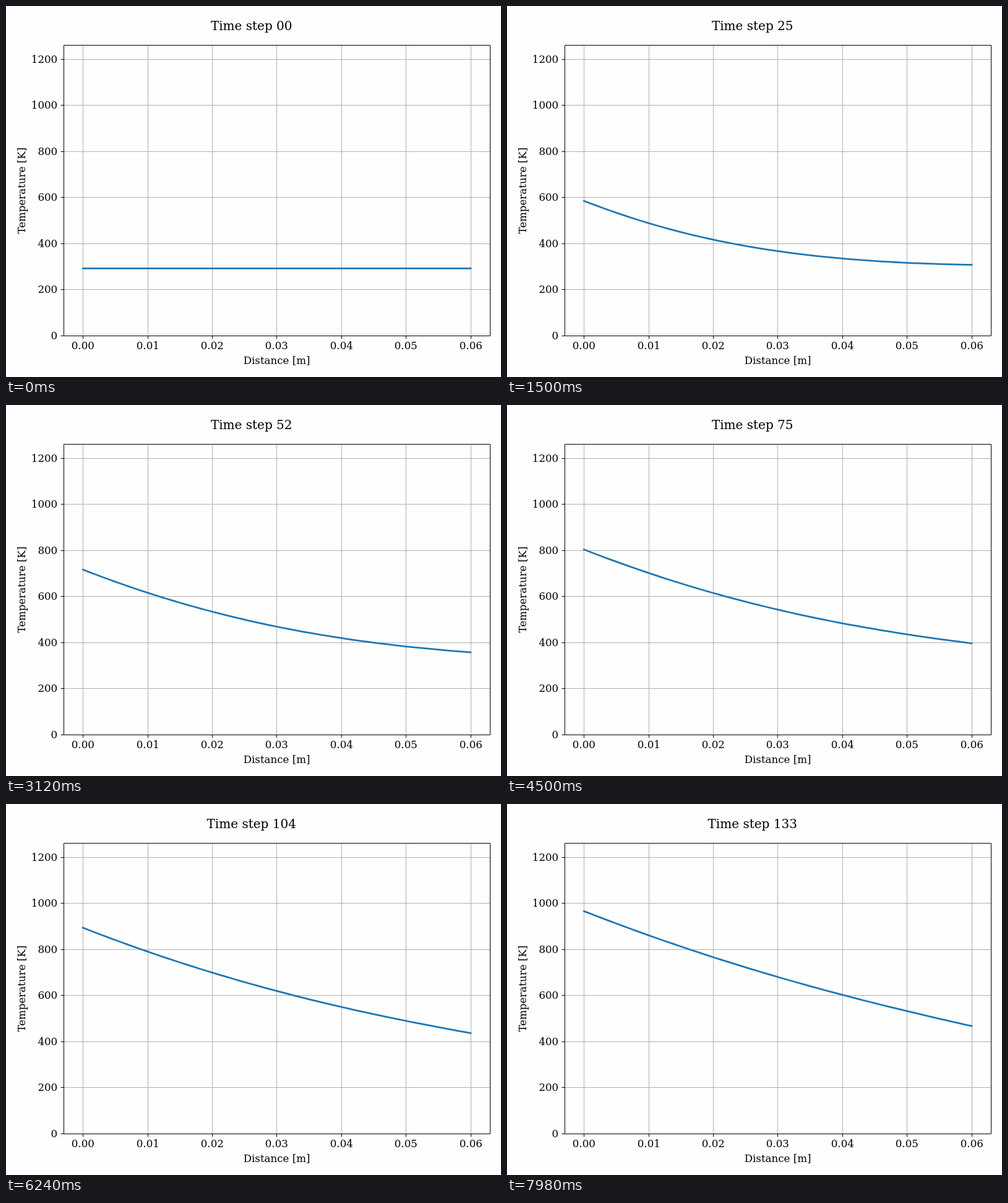
Write an HTML page that moves like this. It is 800 px wide and 600 px high and loops after 8000 ms.

```html
<!DOCTYPE html>
<html lang="en">
<head>
<meta charset="utf-8">
<title>Heat conduction</title>
<style>
html, body { margin: 0; width: 100%; height: 100%; overflow: hidden; background: #fefefe; }
svg { display: block; width: 800px; height: 600px; }
text { font: 16.667px "DejaVu Serif", "Noto Serif", serif; text-anchor: middle; fill: #000; }
#title { font-size: 20px; }
.right { text-anchor: end; }
path { fill: none; }
#grid { stroke: #b0b0b0; }
#axes { stroke: #000; }
#curve { stroke: #1f77b4; stroke-width: 2.78; stroke-linecap: square; stroke-linejoin: round; }
</style>
</head>
<body>
<svg viewBox="0 0 800 600">
  <path id="grid"/>
  <path id="curve"/>
  <path id="axes"/>
  <g id="labels"></g>
  <text id="title" x="396.7" y="39"></text>
  <text x="437.6" y="579">Distance [m]</text>
  <text transform="translate(30.7 298.7) rotate(-90)">Temperature [K]</text>
</svg>
<script>
const $ = id => document.getElementById(id);
const STEP_MS = 60, LOOP_MS = 8000, STEPS = Math.ceil(LOOP_MS / STEP_MS);

function addLabel(text, x, y, cls = '') {
  const el = document.createElementNS('http://www.w3.org/2000/svg', 'text');
  el.textContent = text;
  el.setAttribute('x', x);
  el.setAttribute('y', y);
  el.setAttribute('class', cls);
  $('labels').append(el);
}

function drawAxes() {
  let grid = '', axes = 'M93.5 63.5H782.5V533.5H93.5Z';
  for (let i = 0; i <= 6; i++) {
    const x = Math.round(124.2 + 104.4 * i) + 0.5;
    const y = Math.floor(533 - 74.5 * i) + 0.5;
    grid += `M${x} 64V533M94 ${y}H782`;
    axes += `M${x} 533.5V538.4M93.5 ${y}H88.6`;
    addLabel((i / 100).toFixed(2), x - 0.2, 555);
    addLabel(i * 200, 83.2, y + 5.9, 'right');
  }
  $('grid').setAttribute('d', grid);
  $('axes').setAttribute('d', axes);
}

// 1D heat equation: constant flux on the left, heat loss on the right.
// Temperature rise is in pixels, distance in units of 0.01 m.
function solveHeat() {
  const cells = 60, dx = 6 / cells, substeps = 50;
  const flux = 40.8, rate = 0.225 / substeps / (dx * dx);
  const loss = u => (0.295 + 0.00095 * u) * u;
  let u = new Float64Array(cells + 1);
  const profiles = [u];
  for (let n = 1; n < STEPS; n++) {
    for (let s = 0; s < substeps; s++) {
      const before = u[1] + 2 * dx * flux;
      const after = u[cells - 1] - 2 * dx * loss(u[cells]);
      u = u.map((v, i) => {
        const left = i ? u[i - 1] : before;
        const right = i < cells ? u[i + 1] : after;
        return v + rate * (left - 2 * v + right);
      });
    }
    profiles.push(u);
  }
  return profiles;
}

const toPath = u => 'M' + Array.from(u, (v, i) =>
  `${(124.4 + 626.6 * i / (u.length - 1)).toFixed(2)} ${(424.4 - v).toFixed(2)}`).join('L');

drawAxes();
const paths = solveHeat().map(toPath);
const start = performance.now();
let shown = -1;

function render() {
  const elapsed = Math.max(0, performance.now() - start);
  const step = Math.floor(elapsed % LOOP_MS / STEP_MS);
  if (step !== shown) {
    shown = step;
    $('curve').setAttribute('d', paths[step]);
    $('title').textContent = 'Time step ' + String(step).padStart(2, '0');
  }
  requestAnimationFrame(render);
}
render();
</script>
</body>
</html>
```
